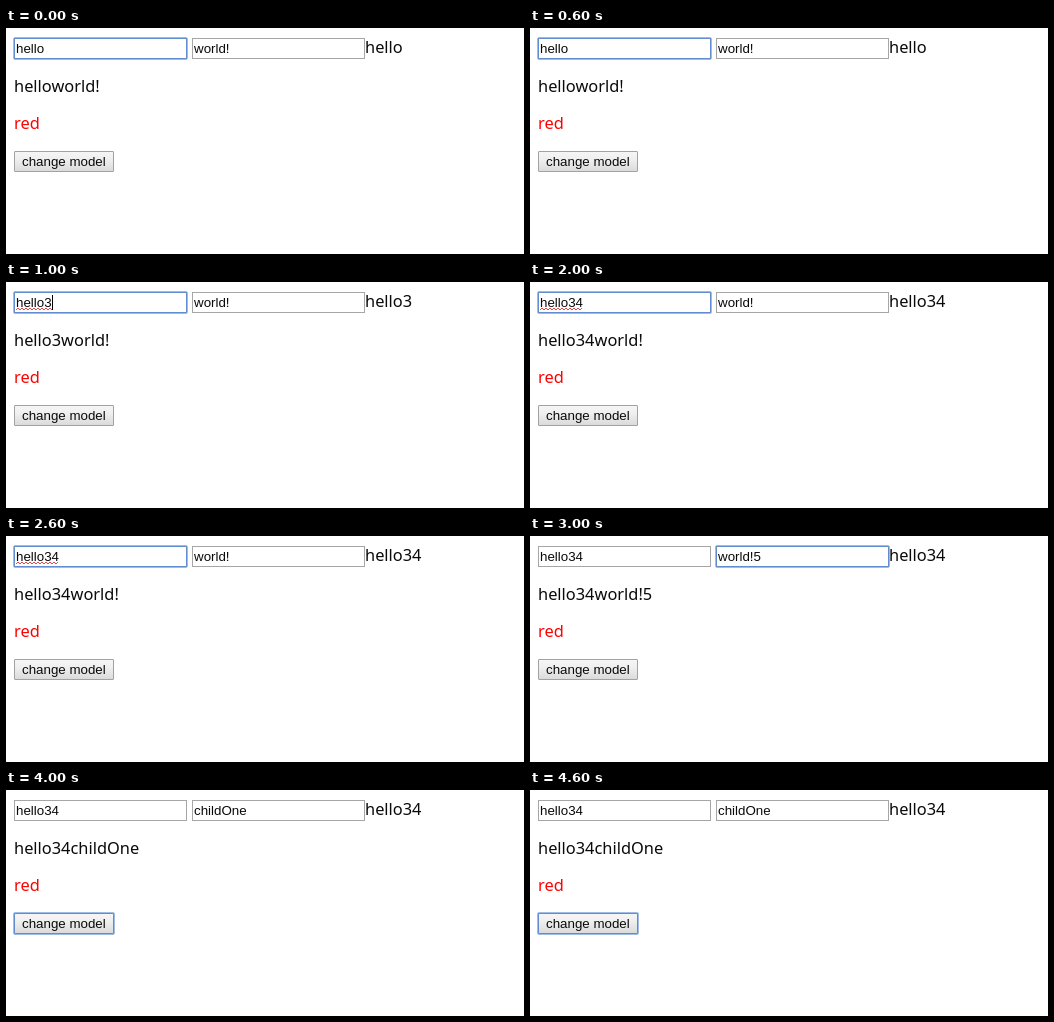
Write an HTML page that moves like this. It is 518 px wide and 226 px high and loops after 5000 ms.

```html
<!DOCTYPE html>
<html lang="en">
<head>
<meta charset="utf-8">
<title>Two-way binding</title>
<style>
  html, body { margin: 0; width: 100%; height: 100%; overflow: hidden; background: #fff; }
  svg { display: block; width: 518px; height: 226px; }
  text { white-space: pre; fill: #0a0a0a; }
  .page { font: 16.4px "Noto Sans", "Open Sans", sans-serif; }
  .control { font: 13.333px "Liberation Sans", Arial, sans-serif; }
  .warn { fill: #f00; }
  .box { fill: #fff; stroke: #a6a6a6; }
  .button { fill: url(#face); stroke: #a2a2a2; }
  .ring rect { fill: none; }
  .glow { stroke: #4d85d6; stroke-opacity: .55; }
  .line { stroke: #5f8dcf; }
</style>
</head>
<body>
<svg viewBox="0 0 518 226">
  <defs>
    <linearGradient id="face" x1="0" y1="0" x2="0" y2="1">
      <stop offset="0" stop-color="#f6f6f6"/>
      <stop offset=".4" stop-color="#efefef"/>
      <stop offset="1" stop-color="#dadada"/>
    </linearGradient>
  </defs>
  <rect class="box" x="8.5" y="10.5" width="172" height="20"/>
  <rect class="box" x="186.5" y="10.5" width="172" height="20"/>
  <rect class="button" x="8.5" y="123.5" width="99" height="20" rx=".5"/>
  <g class="ring">
    <rect class="glow" id="glow" rx="1.5"/>
    <rect class="line" id="line" rx=".5"/>
  </g>
  <path id="squiggle" fill="none" stroke="#e83030" stroke-width=".9"/>
  <text class="control" id="first" x="10" y="25"></text>
  <text class="control" id="second" x="188" y="25"></text>
  <path id="caret" d="M46.5 13V28" stroke="#000"/>
  <text class="page" id="echo" x="359" y="25"></text>
  <text class="page" id="joined" x="8" y="64"></text>
  <text class="page warn" x="8" y="101">red</text>
  <text class="control" x="16" y="138">change model</text>
</svg>
<script>
const STEP = 1000;
const FIRST = [8, 10, 173, 21];
const SECOND = [186, 10, 173, 21];
const BUTTON = [8, 123, 100, 21];

const states = [
  { a: "hello", b: "world!", focus: FIRST },
  { a: "hello3", b: "world!", focus: FIRST, wavyTo: 46, caret: true },
  { a: "hello34", b: "world!", focus: FIRST, wavyTo: 53 },
  { a: "hello34", b: "world!5", focus: SECOND },
  { a: "hello34", b: "childOne", focus: BUTTON }
];

const el = id => document.getElementById(id);

function placeRect(node, [x, y, w, h], grow) {
  const attrs = { x: x + .5 - grow, y: y + .5 - grow, width: w - 1 + 2 * grow, height: h - 1 + 2 * grow };
  for (const key in attrs) node.setAttribute(key, attrs[key]);
}

function wave(end) {
  if (!end) return "";
  let d = "M10 28";
  for (let x = 12, i = 0; x <= end; x += 2, i++) d += `L${x} ${i % 2 ? 28 : 26}`;
  return d;
}

function show({ a, b, focus, wavyTo, caret }) {
  el("first").textContent = a;
  el("second").textContent = b;
  el("echo").textContent = a;
  el("joined").textContent = a + b;
  placeRect(el("glow"), focus, 1);
  placeRect(el("line"), focus, 0);
  el("squiggle").setAttribute("d", wave(wavyTo));
  el("caret").style.display = caret ? "" : "none";
}

let current = -1;
const start = performance.now();

function tick() {
  const t = Math.max(0, performance.now() - start);
  const index = Math.floor(t / STEP) % states.length;
  if (index !== current) show(states[current = index]);
  requestAnimationFrame(tick);
}
tick();
</script>
</body>
</html>
```
